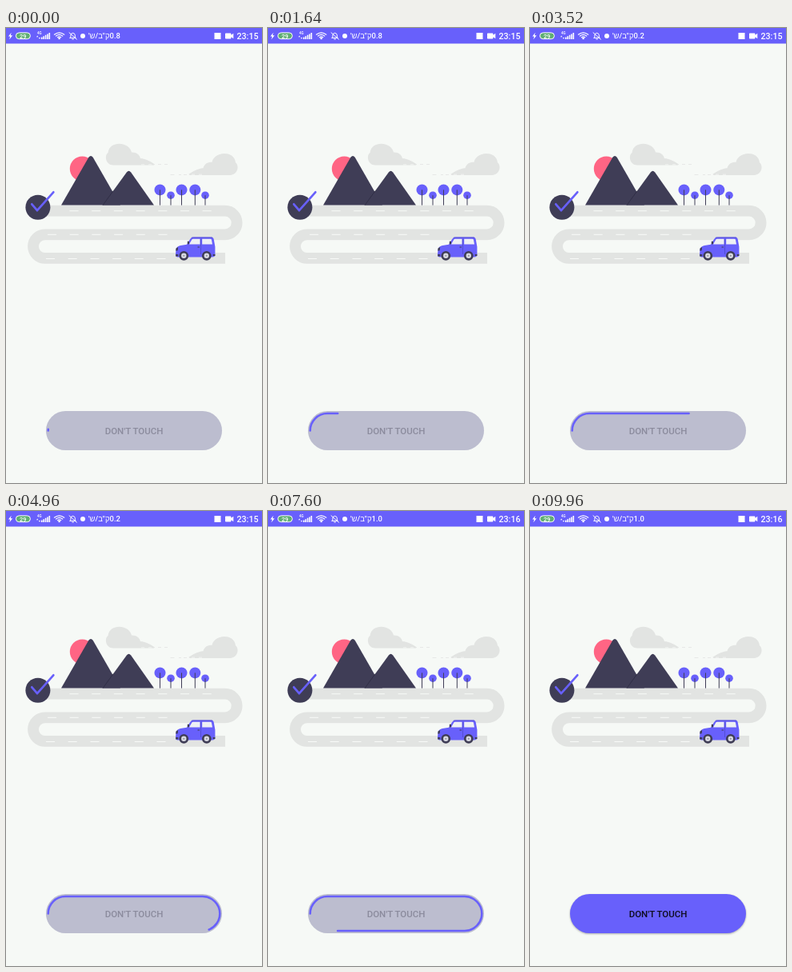
These frames come from a looping animation (320 by 569 pixels, 10000 ms). An HTML page:

```html
<!DOCTYPE html>
<html lang="en">
<head>
<meta charset="utf-8">
<title>Progress button</title>
<style>
  html, body { margin: 0; width: 100%; height: 100%; overflow: hidden; background: #f6f9f6; }
  svg { display: block; width: 100%; height: 100%; }
  text { font-family: Roboto, "Liberation Sans", "DejaVu Sans", sans-serif; font-weight: 500; }
  .violet { fill: #6860fb; }
  .dark { fill: #3f3d56; }
  .grey { fill: #e2e4e2; }
  .line { fill: none; stroke-linecap: round; stroke-linejoin: round; }
</style>
</head>
<body>
<svg viewBox="0 0 320 569" preserveAspectRatio="none">
  <rect width="320" height="569" fill="#f6f9f6"/>

  <!-- status bar -->
  <rect class="violet" width="320" height="19.5"/>
  <g fill="#fff">
    <path d="M6.6 5.8 3 10.6h2.2L4.3 14.2 8.2 9.2H5.8z"/>
    <rect x="12.4" y="5.9" width="18" height="7.8" rx="3.9" fill="#5fae72" stroke="#fff"/>
    <text x="21.2" y="12.5" font-size="7.4" text-anchor="middle">29</text>
    <text x="39" y="8.2" font-size="4.6">4G</text>
    <path d="M38 11.2l1.2-1.7 1.2 1.7zM40.8 12l1.2 1.7 1.2-1.7z"/>
    <path d="M44 11.6h1.6v2.4H44zM46.4 10.2H48V14h-1.6zM48.8 8.8h1.6V14h-1.6zM51.2 7.4h1.6V14h-1.6zM53.5 6h1.6v8h-1.6z"/>
    <circle cx="66.6" cy="13" r="1.3"/>
    <g class="line" stroke="#fff" stroke-width="1.2">
      <path d="M60.4 8.2Q66.6 3.4 72.8 8.2M62.4 10Q66.6 6.8 70.8 10M64.4 11.7Q66.6 10 68.8 11.7"/>
      <path d="M80 12.4h7.2L86.300 11V8.800Q86 6.500 83.600 6.300 81.200 6.500 80.900 8.800V11zM82.800 14h1.600M79 5.800l9.400 8.400" stroke-width="1"/>
    </g>
    <circle cx="96" cy="10" r="3"/>
    <text id="speed" x="143" y="13.300" font-size="9.500" direction="rtl" text-anchor="start"></text>
    <rect x="260.500" y="6" width="8" height="8"/>
    <path d="M274.800 6.400h5.800q.8 0 .8.8v1.600l2.900-2v6.400l-2.900-2v1.600q0 .8-.8.8h-5.800q-.8 0-.8-.8V7.200q0-.8.8-.8z"/>
    <text id="clock" x="302" y="13.900" font-size="10.700" text-anchor="middle"></text>
  </g>

  <!-- clouds -->
  <defs>
    <path id="cloud" d="M134 171.600C124 171 123 159 127.500 156 128.500 148 135 144.800 141.500 144.800 150 144.800 156 150 157 155.500 163 155 167 158.500 168 163 175 163.500 181 167 186 170.500L185 171.600z"/>
  </defs>
  <g class="grey">
    <use href="#cloud"/>
    <use href="#cloud" transform="translate(414.500 12.300) scale(-1 1)"/>
    <path d="M190 170.300h4v.8h-4zM198 170.300h4v.8h-4zM205.500 183h5v.8h-5zM216 183h3v.8h-3zM222 183h4v.8h-4z"/>
  </g>
  <path d="M169 170.900h4M178 170.900h4M232 183.200h4M241 183.200h4" stroke="#f6f9f6" stroke-width=".8"/>

  <!-- road -->
  <path class="line" d="M40 228.700H273.800a14.800 14.800 0 0 1 0 29.600H48.800a14.800 14.800 0 0 0 0 29.600H274"
        stroke="#e2e4e2" stroke-width="13.800" style="stroke-linecap:butt"/>
  <path d="M79.500 228.700H260M52 258.300H212M50 288.500H212" fill="none" stroke="#f8faf8" stroke-width="1" stroke-dasharray="11 16.700"/>

  <!-- mountains -->
  <circle cx="95.300" cy="176" r="15.500" fill="#ff6584"/>
  <g class="dark">
    <path d="M69 221.600 103.300 161.800Q106 158.300 108.700 161.800L143 221.600z"/>
    <path d="M121 221.600 150.800 180.500Q153.500 177.200 156.200 180.500L185 221.600z"/>
  </g>
  <path d="M134 203.700 121 221.600" stroke="#2d2b42" stroke-width=".8"/>

  <g id="trees"></g>

  <!-- check mark -->
  <circle class="dark" cx="39.900" cy="224.200" r="15.500"/>
  <path class="line" d="M32.300 220.300 39 228.200 59.300 205.300" stroke="#6860fb" stroke-width="2.700"/>

  <!-- car -->
  <path class="violet" d="M212 283 212.600 276.500Q213.200 273 218 272L226 270.800 230 264.200Q231.300 261.700 234 261.500H256.500Q259.300 261.700 259.800 264.500L261.400 273.500V283Q261.400 286.500 258 286.500H214.500Q212 286.500 212 283z"/>
  <path d="M229 270.600 232.200 264.800Q232.800 263.700 234 263.700H242.500V270.600zM245.200 263.700H255.500Q256.700 263.700 257 265L258 270.600H245.200z" fill="#eef0f4"/>
  <path d="M232 262.100H258M243.500 264V283" fill="none" stroke="#4d47c4" stroke-width=".7"/>
  <path class="dark" d="M226.800 266.800h2.200v3.400h-2.200zM212.500 275.500l2.600-1.500-.4 4.300-2.400.5zM239.500 273.500h2.500v.9h-2.500zM212.200 283h3v2.400h-3zM258.700 283h2.700v2h-2.700z"/>
  <g id="wheels"></g>

  <!-- button -->
  <rect id="button" x="50" y="479" width="220" height="49" rx="24.500"/>
  <path id="bar" class="line" pathLength="1" stroke="#6860fb" stroke-width="2.600"
        d="M52.700 503.500A21.500 21.500 0 0 1 74.200 482H245.800A21.500 21.500 0 0 1 245.800 525H74.200A21.500 21.500 0 0 1 52.700 503.500z"/>
  <text id="label" x="160" y="508.100" font-size="11.500" text-anchor="middle">DON'T TOUCH</text>
</svg>
<script>
const LOOP = 10000, LEAD = 380, DONE = LOOP - LEAD;
const $ = id => document.getElementById(id);
const clamp = v => Math.max(0, Math.min(1, v));

const tree = (x, y, r) =>
  `<circle class="violet" cx="${x}" cy="${y}" r="${r}"/>` +
  `<path d="M${x} ${y}V221.600" stroke="#3f3d56"/>`;
$('trees').innerHTML =
  [192.5, 219.5, 236.3].map(x => tree(x, 202.4, 7)).join('') +
  [206, 249].map(x => tree(x, 209.2, 4.800)).join('');

$('wheels').innerHTML = [222.3, 250.8].map(x =>
  `<circle class="dark" cx="${x}" cy="284.800" r="5.900"/>` +
  `<circle cx="${x}" cy="284.800" r="3.200" fill="#d9dae2"/>` +
  `<circle cx="${x}" cy="284.800" r="1" fill="#8d8c9c"/>`).join('');

function draw(t) {
  const speed = t < 2800 ? '0.8' : t < 6800 ? '0.2' : '1.0';
  $('speed').textContent = speed + 'ק"ב/ש\'';
  $('clock').textContent = t < 5700 ? '23:15' : '23:16';

  const done = t >= DONE;
  const part = (1 - Math.cos(Math.PI * clamp((t + LEAD) / LOOP))) / 2;
  const bar = $('bar'), button = $('button');
  bar.setAttribute('stroke-dasharray', `${part} 2`);
  bar.style.display = done ? 'none' : '';

  button.setAttribute('fill', done ? '#6860fb' : '#bcbdcf');
  const lift = clamp((t - DONE) / 100);
  button.style.filter = done ? `drop-shadow(0 ${1.5 * lift}px 1.3px rgba(0,0,0,${0.3 * lift}))` : 'none';
  $('label').setAttribute('fill', done ? '#0d0c1c' : '#8b8b9d');
}

function tick() {
  draw(performance.now() % LOOP);
  requestAnimationFrame(tick);
}
tick();
</script>
</body>
</html>
```
